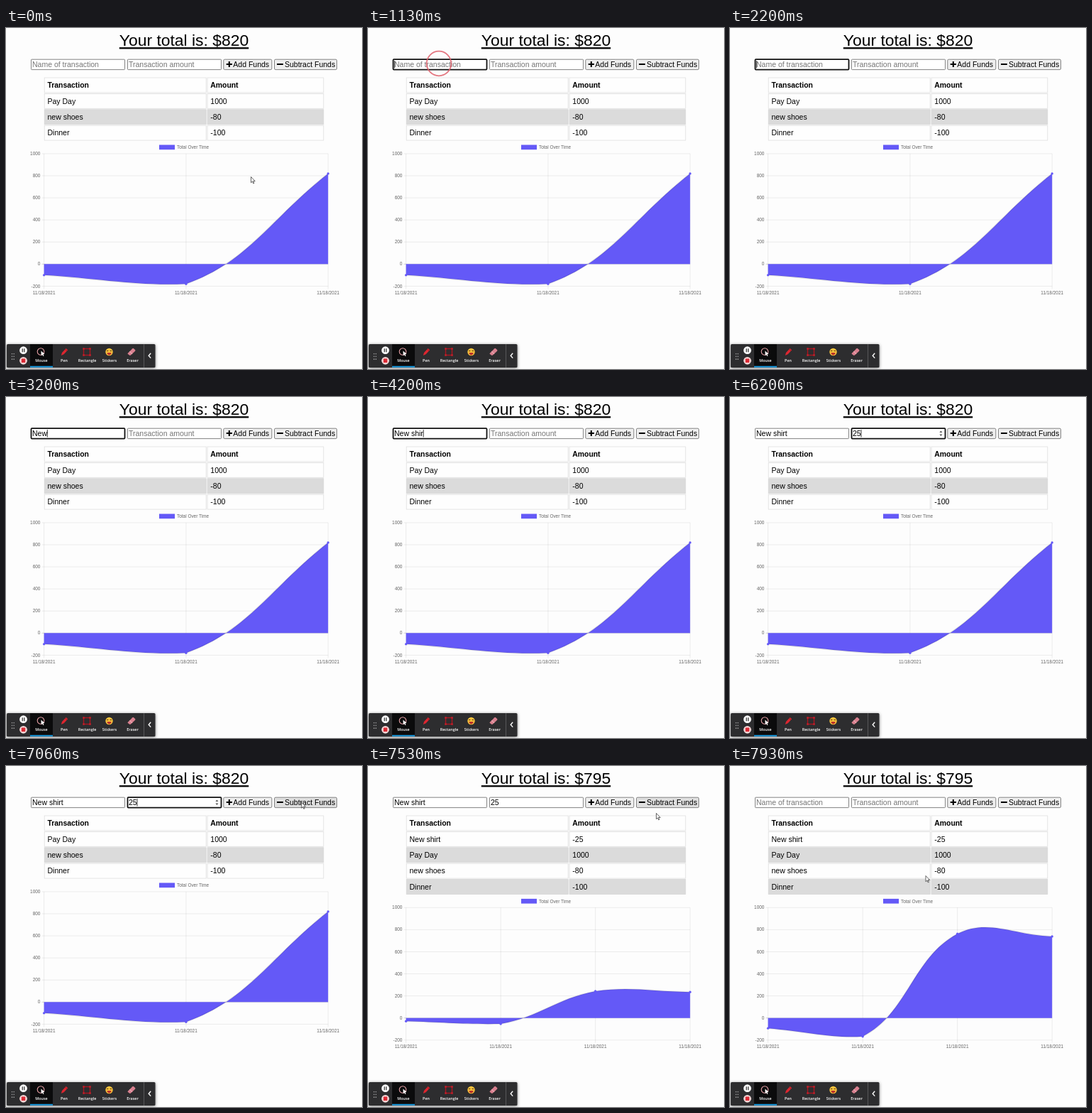
These frames come from a looping animation (502 by 480 pixels, 8000 ms). An HTML page:

```html
<!DOCTYPE html>
<html lang="en">
<head>
<meta charset="utf-8">
<title>Budget tracker</title>
<style>
  html, body { margin: 0; width: 100%; height: 100%; overflow: hidden; background: #fdfdfd; }
  svg { display: block; width: 502px; height: 480px; font: 10.5px Arial, "Liberation Sans", sans-serif; }
  text { white-space: pre; }
  .title { font-size: 22.9px; text-anchor: middle; text-decoration: underline; }
  .head { font-size: 10.4px; font-weight: bold; }
  .hint { fill: #757575; }
  .tick { font-size: 6.45px; fill: #666; }
  .mid { text-anchor: middle; }
  .end { text-anchor: end; }
  .tool { font: 600 5.4px "Open Sans", Arial, sans-serif; fill: #fff; text-anchor: middle; }
  .bar { filter: drop-shadow(0 1px 2px #0008); }
</style>
</head>
<body>
<svg viewBox="0 0 502 480">
  <g id="scene"></g>
  <g id="toolbar">
    <rect class="bar" x="1" y="445" width="209.5" height="33" rx="1.5" fill="#2d2d2f"/>
    <path d="M8.5 458v9M11.2 458v9" stroke="#aaa" stroke-width="1.3" stroke-dasharray="1.3 2.5"/>
    <circle cx="24.5" cy="453.7" r="5.4" fill="#fff"/>
    <path d="M23.2 451.2v5M25.8 451.2v5" stroke="#333" stroke-width="1.3"/>
    <circle cx="24.5" cy="468.3" r="5.4" fill="#f3d5d5"/>
    <rect x="21.8" y="465.6" width="5.4" height="5.4" rx=".6" fill="#dc2a35"/>
    <rect x="34" y="445" width="32" height="33" fill="#0b0b0c"/>
    <rect x="34" y="475.8" width="32" height="2" fill="#1b9be0"/>
    <circle cx="49" cy="455.5" r="4.8" fill="none" stroke="#e8a0a6" stroke-width="1.1"/>
    <path d="M49.5 454.5l5 4.6-2.2.2 1.2 2.3-1.2.5-1-2.3-1.6 1.4z" fill="#fff"/>
    <path d="M77.8 461l1.2-4 5.6-6 2.6 2.2-5.6 6.1z" fill="#dd2630"/>
    <path d="M83.4 452.2l2.6 2.3" stroke="#8d1219" stroke-width=".8"/>
    <rect x="109.5" y="451.5" width="9" height="9" fill="none" stroke="#a91620" stroke-width="1.4"/>
    <path d="M109.5 451.5h.01M118.5 451.5h.01M109.5 460.5h.01M118.5 460.5h.01" stroke="#c51f2a" stroke-width="2.4" stroke-linecap="square"/>
    <circle cx="145.5" cy="456" r="5.2" fill="#f8c33c"/>
    <path d="M142 454.5h2.4M146.6 454.5h2.4" stroke="#5a3510" stroke-width="1.2"/>
    <path d="M142.3 457h6.4q-.8 3.4-3.2 3.4t-3.2-3.4z" fill="#b8322a"/>
    <path d="M171.8 457.8l6.6-6.6q1-.8 2 .2l1.7 1.7q.8 1-.2 2l-6 5.5q-1 .7-2 0l-2-1.6q-.7-.6-.1-1.2z" fill="#d9808f"/>
    <path d="M174.4 455.2l3.8 3.8" stroke="#f3c3ca" stroke-width=".9"/>
    <path d="M194.5 445v33" stroke="#58585a"/>
    <path d="M204.2 457.8l-3 3.4 3 3.4" fill="none" stroke="#fff" stroke-width="1.4"/>
    <g class="tool">
      <text x="50" y="470.3">Mouse</text><text x="82" y="470.3">Pen</text>
      <text x="114.5" y="470.3">Rectangle</text><text x="146" y="470.3">Stickers</text>
      <text x="178.5" y="470.3">Eraser</text>
    </g>
  </g>
  <g id="pointer"></g>
</svg>
<script>
const LOOP = 8000, FOCUS = 1070, TAB = 5000, SUBMIT = 7455, CLEAR = 7660;
const PURPLE = '#6459f7';
const scene = document.getElementById('scene');
const pointer = document.getElementById('pointer');
const pen = document.createElement('canvas').getContext('2d');
pen.font = '10.5px Arial, "Liberation Sans", sans-serif';

const nameKeys = [2650, 2900, 3130, 3460, 3660, 3860, 4000, 4130, 4330];
const amountKeys = [5730, 5960];
const path = [[200, 345.5, 209.5], [860, 100, 50], [6450, 100, 50], [7100, 420, 51],
              [7400, 417, 52], [7530, 406.5, 66.5], [7930, 276, 154.5]];
const oldRows = [['Pay Day', 1000], ['new shoes', -80], ['Dinner', -100]];
const newRows = [['New shirt', -25], ...oldRows];

const clamp = (v, a, b) => Math.min(b, Math.max(a, v));
const mix = (a, b, k) => a + (b - a) * k;
const text = (x, y, s, cls = '') => `<text x="${x}" y="${y}" class="${cls}">${s}</text>`;
const rect = (x, y, w, h, fill, more = '') =>
  `<rect x="${x}" y="${y}" width="${w}" height="${h}" fill="${fill}" ${more}/>`;
const line = (d, color, w) => `<path d="${d}" fill="none" stroke="${color}" stroke-width="${w}"/>`;
const typed = (s, keys, t) => t >= CLEAR ? '' : s.slice(0, keys.filter(k => k <= t).length);

function field(x, value, hint, focused, caret) {
  const edge = focused ? 'stroke="#111" stroke-width="1.8" rx="1"' : 'stroke="#767676" stroke-width=".9" rx=".8"';
  let out = rect(x + .5, 44.2, 132, 14.4, '#fff', edge);
  out += value ? text(x + 2, 54.6, value) : text(x + 2, 54.6, hint, 'hint');
  if (caret) {
    const cx = x + 2.3 + pen.measureText(value).width;
    out += line(`M${cx} 46v10.5`, '#000', .8);
  }
  return out;
}

function form(t) {
  const onName = t >= FOCUS && t < TAB, onAmount = t >= TAB && t < 7330;
  const lastKey = Math.max(FOCUS, TAB * onAmount, ...[...nameKeys, ...amountKeys].filter(k => k <= t));
  const caret = (t - lastKey) % 1060 < 530;
  const button = (x, w, on) => rect(x, 44.2, w, 14.4, on ? '#dfdfdf' : '#efefef',
    'stroke="#767676" stroke-width=".9" rx="1.6"');
  let out = field(35, typed('New shirt', nameKeys, t), 'Name of transaction', onName, onName && caret)
    + field(171, typed('25', amountKeys, t), 'Transaction amount', onAmount, onAmount && caret);
  if (onAmount) out += '<path d="M295.4 50l2-2.5 2 2.5zM295.4 52.4l2 2.5 2-2.5z" fill="#555"/>';
  return out + button(306.8, 68, false) + button(378.5, 88, t > 7000 && t < 7600)
    + line('M310.7 51h8.2M314.8 46.9v8.2M382 51h8.8', '#000', 2.1)
    + text(320.3, 54.6, 'Add Funds') + text(393, 54.6, 'Subtract Funds');
}

function table(rows) {
  return [['Transaction', 'Amount'], ...rows].map(([name, amount], i) => {
    const y = 70 + i * 22.4, shade = i && i % 2 === 0;
    const cell = (x, w, s) => rect(x, y, w, 20.9, shade ? '#dbdbdb' : '#fefefe',
      `stroke="${shade ? '#d6d6d6' : '#dedede'}" stroke-width=".8"`)
      + text(x + 4.3, y + 14.2, s, i ? '' : 'head');
    return cell(54.2, 228, name) + cell(284, 163.8, amount);
  }).join('');
}

// Cubic spline with tension 0.4, handles kept inside the plot.
function spline(pts, top, bottom) {
  const handles = pts.map((p, i) => {
    const a = pts[i - 1] || p, b = pts[i + 1] || p;
    const da = Math.hypot(p[0] - a[0], p[1] - a[1]), db = Math.hypot(b[0] - p[0], b[1] - p[1]);
    const at = k => [p[0] + k * (b[0] - a[0]), clamp(p[1] + k * (b[1] - a[1]), top, bottom)];
    const first = i === 0, last = i === pts.length - 1;
    return [first ? p : at(-.4 * da / (da + db)), last ? p : at(.4 * db / (da + db))];
  });
  return pts.flatMap((p, i) => i ? [handles[i - 1][1], handles[i][0], p] : [p]);
}

function chart(values, top, grow) {
  const left = 53.6, right = 454.2, unit = 186.5 / 1200;
  const yOf = v => top + (1000 - v) * unit, xOf = i => mix(left, right, i / (values.length - 1));
  const zero = yOf(0), bottom = yOf(-200);
  let out = rect(216, top - 12.4, 22, 6.7, PURPLE) + text(241, top - 6.8, 'Total Over Time', 'tick');
  for (let v = 1000; v >= -200; v -= 200)
    out += line(`M50.5 ${yOf(v)}H${right}`, v ? '#0000001a' : '#00000040', .7)
      + text(48.4, yOf(v) + 2.1, v, 'tick end');
  values.forEach((_, i) => {
    out += line(`M${xOf(i)} ${top}V${bottom + 4}`, '#0000001a', .7)
      + text(xOf(i), bottom + 11.2, '11/18/2021', 'tick mid');
  });
  const full = spline(values.map((v, i) => [xOf(i), yOf(v)]), top, bottom);
  const flat = spline(values.map((_, i) => [xOf(i), zero]), top, bottom);
  const pts = full.map((p, i) => p.map((v, j) => mix(flat[i][j], v, grow)));
  const curve = `${pts[0]}C${pts.slice(1).join(' ')}`;
  out += `<path d="M${left} ${zero}L${curve}L${right} ${zero}z" fill="${PURPLE}"/>`
    + line('M' + curve, '#0000001a', 1.6);
  pts.forEach(([x, y], i) => {
    if (i % 3 === 0) out += `<circle cx="${x}" cy="${y}" r="1.7" fill="${PURPLE}"/>`;
  });
  return out;
}

function pointerAt(t) {
  const i = path.findIndex(p => p[0] > t);
  if (i < 0) return path[path.length - 1].slice(1);
  if (i === 0) return path[0].slice(1);
  const [t0, x0, y0] = path[i - 1], [t1, x1, y1] = path[i];
  const k = (t - t0) / (t1 - t0), e = k * k * (3 - 2 * k);
  return [mix(x0, x1, e), mix(y0, y1, e)];
}

function drawPointer(t) {
  const [x, y] = pointerAt(t);
  const inField = x > 35 && x < 304 && y > 44 && y < 59;
  const ring = (from, to) => t < from || t > to ? '' :
    `<circle cx="${x}" cy="${y}" r="17.3" fill="none" stroke="#e0606c" stroke-width="1.8"
      opacity="${clamp((to - t) / 200, 0, .85)}"/>`;
  const arrow = `<path transform="translate(${x} ${y})" d="M0 0v8.2l1.9-1.7 1.3 2.9 1.2-.5-1.3-2.9h2.6z"
    fill="#fff" stroke="#333" stroke-width=".75"/>`;
  return ring(1000, 1400) + ring(7260, 7460) + (inField ? '' : arrow);
}

function draw(now) {
  const t = now % LOOP, done = t >= SUBMIT;
  const grow = done ? 1 - (1 - clamp((t - SUBMIT + 8) / 1000, 0, 1)) ** 4 : 1;
  scene.innerHTML = text(251, 25.2, `Your total is: $${done ? 795 : 820}`, 'title') + form(t)
    + table(done ? newRows : oldRows)
    + chart(done ? [-100, -180, 820, 795] : [-100, -180, 820], done ? 199.3 : 176.9, grow);
  pointer.innerHTML = drawPointer(t);
}

const start = performance.now();
function tick() {
  draw(performance.now() - start);
  requestAnimationFrame(tick);
}
tick();
</script>
</body>
</html>
```
